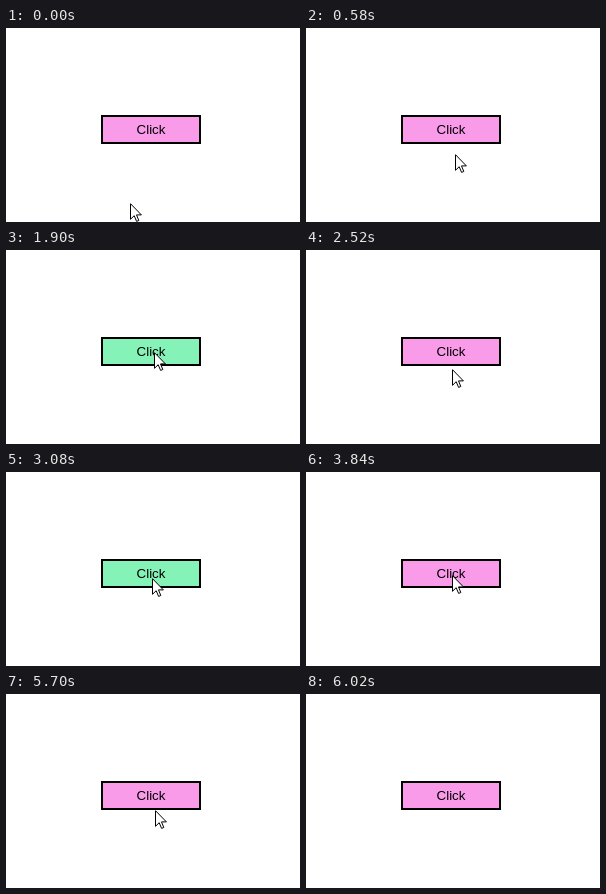
Write an HTML page that moves like this. It is 294 px wide and 194 px high and loops after 6910 ms.

```html
<!DOCTYPE html>
<html lang="en">
<head>
<meta charset="utf-8">
<title>Click toggle</title>
<style>
  html, body { margin: 0; width: 100%; height: 100%; overflow: hidden; background: #fff; }
  #stage { position: relative; width: 294px; height: 194px; overflow: hidden; }
  #button {
    position: absolute; left: 95px; top: 87px; width: 100px; height: 29px;
    box-sizing: border-box; border: 2px solid #000; background: #fa9bea;
    font: 13.333px/25px "Liberation Sans", Arial, sans-serif;
    text-align: center; color: #000;
  }
  #button.on { background: #85f3b8; }
  #cursor { position: absolute; left: 0; top: 0; }
</style>
</head>
<body>
<div id="stage">
  <div id="button">Click</div>
  <svg id="cursor" width="13" height="20">
    <path d="M.5 .7V16.3L4.2 12.7L6.6 18.4L8.8 17.5L6.5 11.9H11.4Z" fill="#fff" stroke="#000"/>
  </svg>
</div>
<script>
  const LOOP = 6910, STEP = 20;
  const OUT_PACE = 9.5, BACK_PACE = 18; // ms per pixel
  const LAST_CLICK = 5600;
  const button = document.getElementById('button');
  const cursor = document.getElementById('cursor');

  const linear = p => p;
  const easeOut = p => 1 - (1 - p) ** 3;

  // After each click the pointer dips off the button and comes back.
  const dips = [
    { click: 1140, out: 1420, low: 121, back: 1900, rest: 102 },
    { click: 2140, out: 2340, low: 120, back: 2820, rest: 103 },
    { click: 3040, out: 3120, low: 110, back: 3500, rest: 103 },
    { click: 3840, out: 4100, low: 123, back: 4600, rest: 102 },
    { click: 4780, out: 4940, low: 114, back: 5340, rest: 99 }
  ];
  const clicks = [...dips.map(d => d.click), LAST_CLICK];

  // The hand drifts left in the middle of the loop and right at its ends.
  const drift = t => 146 + 5 * Math.min(1, ((t - 3560) / 2220) ** 4);

  const legs = [];
  let last = { x: 124, y: 175 };

  function go(end, duration, x, y, ease = linear) {
    const to = { x, y };
    legs.push({ start: end - duration, duration, from: last, to, ease });
    last = to;
  }

  function hop(end, pace, y, ease) {
    go(end, Math.abs(y - last.y) * pace, drift(end), y, ease);
  }

  go(700, 700, 154, 116);
  hop(900, OUT_PACE, 104);
  for (const d of dips) {
    hop(d.out, OUT_PACE, d.low);
    hop(d.back, BACK_PACE, d.rest, easeOut);
  }
  go(5700, 80, 149, 116);
  go(6020, 320, 75, 195);

  function pointerAt(t) {
    const leg = legs.findLast(l => l.start <= t);
    const p = leg.ease(Math.min(1, (t - leg.start) / leg.duration));
    const mix = axis => Math.round(leg.from[axis] + (leg.to[axis] - leg.from[axis]) * p);
    return [mix('x'), mix('y')];
  }

  function draw(now) {
    const t = Math.floor((now % LOOP) / STEP) * STEP;
    const [x, y] = pointerAt(t);
    cursor.style.transform = `translate(${x}px, ${y}px)`;
    button.classList.toggle('on', clicks.filter(c => t >= c).length % 2 === 1);
  }

  const begin = performance.now();
  function tick() {
    draw(performance.now() - begin);
    requestAnimationFrame(tick);
  }
  tick();
</script>
</body>
</html>
```
